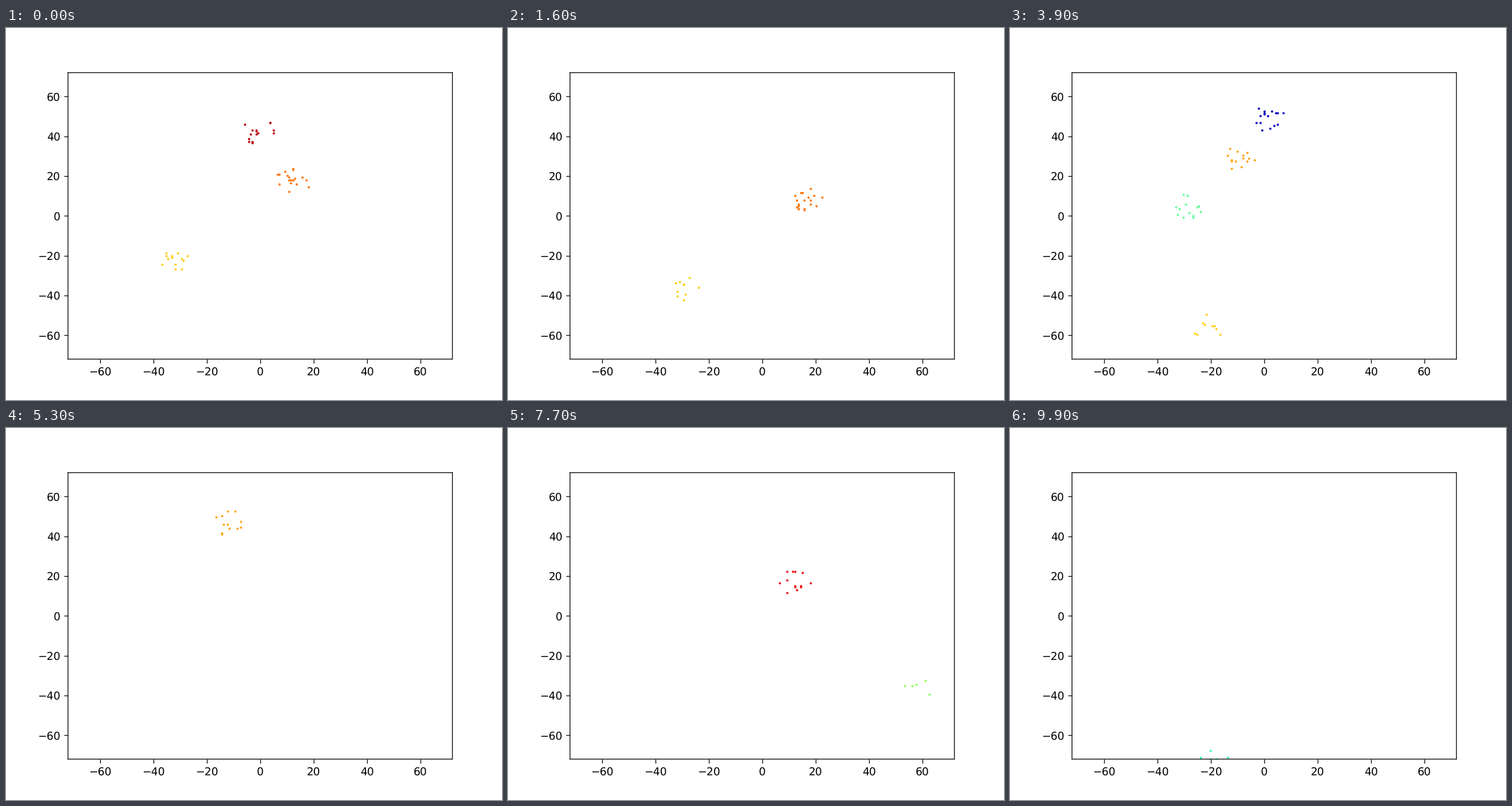
Write a matplotlib script that moves like this. It is 864x648 px and loops after 10 s.

```python
import matplotlib.pyplot as plt
import numpy as np
from matplotlib.animation import FuncAnimation

FRAMES = 100
LIMIT = 72
CELL = 0.72      # hits fall on a regular grid
RADIUS = 6.7

# colour, first and last step, start and end of a straight path, typical hits
TRACKS = [
    ("#bf0008", 0, 9, (-0.8, 42), (0, 38), 14),
    ("#ff7608", 0, 18, (12.5, 18), (17.8, 6), 19),
    ("#ffd010", 0, 44, (-33, -23), (-19, -60), 11),
    ("#60ff98", 27, 42, (-37.5, 5), (-27, 4), 12),
    ("#0000c4", 36, 44, (2, 47), (2, 52), 16),
    ("#ffa410", 35, 76, (-8.4, 24), (-15.4, 77), 12),
    ("#90ff60", 60, 77, (36, -32), (56.5, -37), 5),
    ("#f01010", 60, 94, (2.5, 13), (22, 22.5), 12),
    ("#30ffc4", 88, 99, (-19, -69), (-19, -73), 11),
]

# soft, unsnapped lines
plt.rcParams.update({
    "path.snap": False,
    "axes.linewidth": 0.72,
    "xtick.major.width": 0.72,
    "ytick.major.width": 0.72,
    "text.hinting": "no_hinting",
})

fig, ax = plt.subplots(figsize=(6.4, 4.8), dpi=135)
ax.set_xlim(-LIMIT, LIMIT)
ax.set_ylim(-LIMIT, LIMIT)

origin, = ax.plot([], [], ",", color="#c8c8c8")
clouds = [ax.plot([], [], "o", ms=2.1, mew=0, color=track[0])[0]
          for track in TRACKS]


def hits(step, index):
    """Random hits around a steadily moving centre, new for every step."""
    _, first, last, start, end, typical = TRACKS[index]
    if not first <= step <= last:
        return [], []
    rng = np.random.default_rng([step, index])
    n = typical + rng.integers(-2, 3)
    r = RADIUS * rng.random(n) ** 0.6
    angle = rng.uniform(0, 2 * np.pi, n)
    t = (step - first) / (last - first)
    x, y = np.array(start) + t * np.subtract(end, start)
    points = np.array([x + r * np.cos(angle), y + r * np.sin(angle)])
    return np.round(points / CELL) * CELL


def draw(step):
    origin.set_data([step % 2], [step % 2])
    for index, cloud in enumerate(clouds):
        cloud.set_data(*hits(step, index))
    return [origin, *clouds]


anim = FuncAnimation(fig, draw, frames=FRAMES, init_func=lambda: draw(0),
                     interval=100, repeat=True, repeat_delay=0)
plt.show()
```
